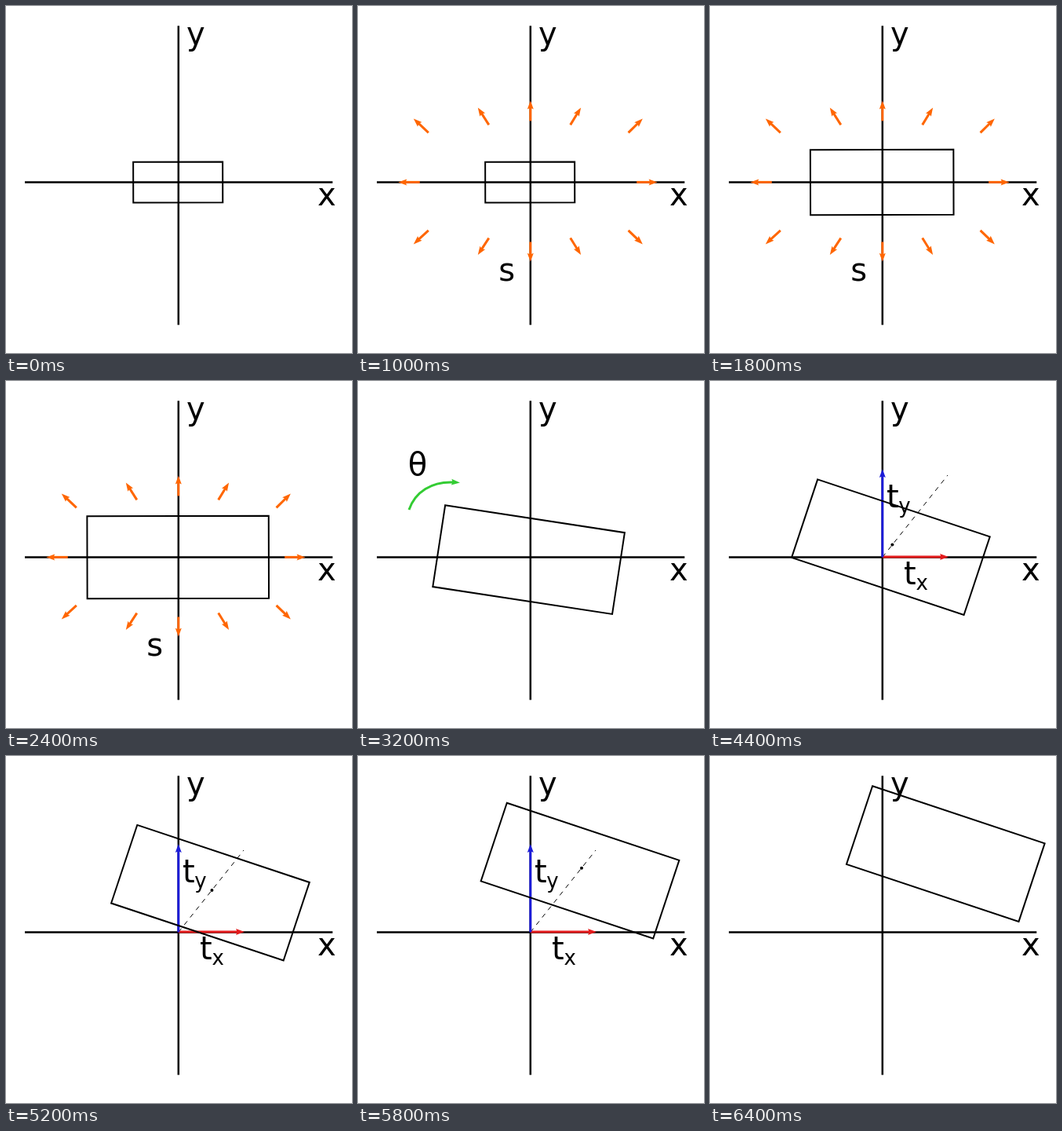
Animation of 441 by 442 pixels, one loop 7400 ms. Source, as an HTML page:

```html
<!DOCTYPE html>
<html lang="en">
<head>
<meta charset="utf-8">
<title>Scale, rotate, translate</title>
<style>
  html, body { margin: 0; width: 100%; height: 100%; overflow: hidden; background: #fff; }
  svg { display: block; width: 441px; height: 442px; }
  text { font: 40px "DejaVu Sans", sans-serif; }
  .sub { font-size: 26px; }
</style>
</head>
<body>
<svg viewBox="0 0 441 442">
  <path d="M24 224.4H416.3M219.8 25.3V406.3" stroke="#000" stroke-width="2.5"/>
  <text x="230" y="49.3">y</text>
  <text x="397" y="254">x</text>
  <g id="scale">
    <text x="179.3" y="350">s</text>
  </g>
  <g id="turn">
    <path d="M65 164C73 141 94 128 121 129" fill="none" stroke="#3c3" stroke-width="3"/>
    <text x="63.7" y="119.7">θ</text>
  </g>
  <g id="move">
    <path d="M219.8 224.4L303 120" stroke="#000" stroke-dasharray="6"/>
    <circle id="dot" r="2"/>
    <text x="225" y="161">t</text><text class="sub" x="240.3" y="168">y</text>
    <text x="247" y="259">t</text><text class="sub" x="262.6" y="266">x</text>
  </g>
  <polygon id="box" fill="none" stroke="#000" stroke-width="2"/>
</svg>
<script>
const $ = id => document.getElementById(id);
const clamp = v => Math.min(1, Math.max(0, v));
const X0 = 219.8, Y0 = 224.4;

function arrow(group, color, x1, y1, x2, y2) {
  const len = Math.hypot(x2 - x1, y2 - y1);
  const angle = Math.atan2(y2 - y1, x2 - x1) * 180 / Math.PI;
  $(group).insertAdjacentHTML('beforeend',
    `<g transform="translate(${x2} ${y2}) rotate(${angle})" fill="${color}">
      <path d="M${-len} -1.5H-8V1.5H${-len}Z"/>
      <path d="M0 0L-11 4Q-8.5 0 -11 -4Z"/>
    </g>`);
}

// One quadrant of outward arrows, mirrored; the right and lower sides are a little tighter.
const quadrant = [[0, 78, 0, 104], [53, 73, 67, 95], [130, 63, 149, 81], [141, 0, 168.5, 0]];
for (const [x1, y1, x2, y2] of quadrant)
  for (const sx of x1 ? [-1, 0.96] : [1])
    for (const sy of y1 ? [-1, 0.975] : [1])
      arrow('scale', '#f60', X0 + x1 * sx, Y0 + y1 * sy, X0 + x2 * sx, Y0 + y2 * sy);

arrow('turn', '#3c3', 120, 128.7, 130, 129.4);
arrow('move', '#e31b1c', X0, Y0 - 0.5, 304, Y0 - 0.5);
arrow('move', '#1c1cd8', X0, Y0, X0, 112);

// The pose advances once every 200 ms after the opening pause.
function draw(ms) {
  const step = Math.floor((ms - 1000) / 200);
  const grow = clamp(step * 0.1458);
  const angle = (step < 8 ? -0.15 : step < 15 ? (step - 8) * 2.893 : 18.4) * Math.PI / 180;
  const shift = clamp((step - 15.3) / 11);

  const cx = (step < 8 ? 219.2 : 217.6) + 82.7 * shift;
  const cy = (step < 8 ? 224.5 : 227.6) - 103 * shift;
  const w = 57 + 58.7 * grow, h = 25.9 + 26.6 * grow;
  const c = Math.cos(angle), s = Math.sin(angle);
  const corner = ([i, j]) => [cx + i * w * c - j * h * s, cy + i * w * s + j * h * c];
  $('box').setAttribute('points', [[-1, -1], [1, -1], [1, 1], [-1, 1]].map(corner).join(' '));
  $('dot').setAttribute('cx', cx + 2);
  $('dot').setAttribute('cy', cy - 3.3);

  const show = (id, from, to) => $(id).style.display = step >= from && step < to ? '' : 'none';
  show('scale', 0, 8);
  show('turn', 8, 15);
  show('move', 15, 27);
}

const start = performance.now();
function tick() {
  draw((performance.now() - start) % 7400);
  requestAnimationFrame(tick);
}
tick();
</script>
</body>
</html>
```
